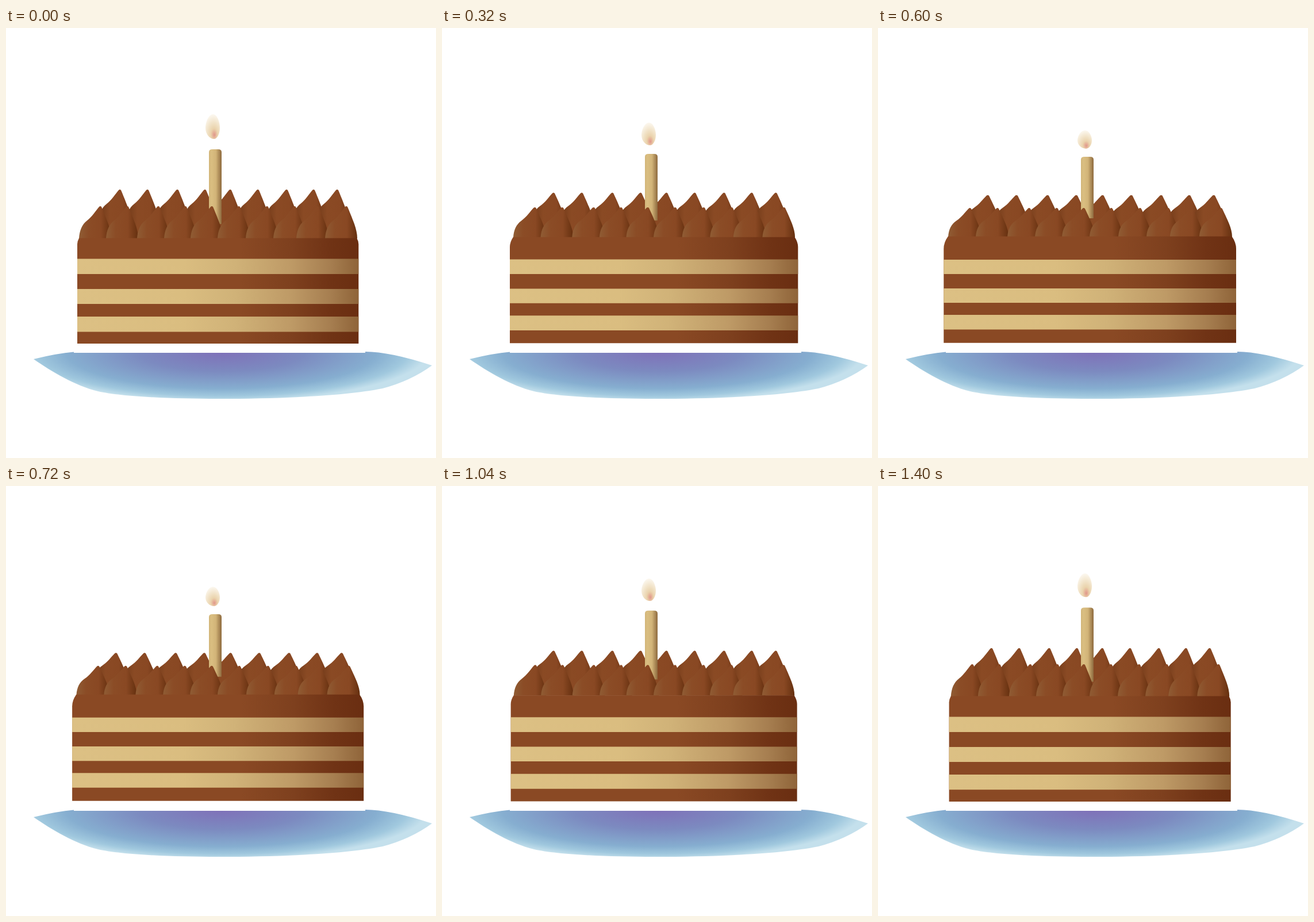
Write an HTML page that moves like this. It is 748 px wide and 748 px high and loops after 1440 ms.

```html
<!DOCTYPE html>
<html lang="en">
<head>
<meta charset="utf-8">
<title>Cake</title>
<style>
  html, body { margin: 0; width: 100%; height: 100%; overflow: hidden; background: #fff; }
  svg { display: block; width: 100vw; height: 100vh; }
</style>
</head>
<body>
<svg viewBox="0 0 748 748">
  <defs>
    <linearGradient id="choc">
      <stop offset="0" stop-color="#8a4924"/>
      <stop offset=".58" stop-color="#8a4924"/>
      <stop offset=".76" stop-color="#7e401e"/>
      <stop offset=".9" stop-color="#703315"/>
      <stop offset="1" stop-color="#6a2e11"/>
    </linearGradient>
    <linearGradient id="cream">
      <stop offset="0" stop-color="#dcc084"/>
      <stop offset=".38" stop-color="#dabd80"/>
      <stop offset=".56" stop-color="#d0b278"/>
      <stop offset=".76" stop-color="#be9a66"/>
      <stop offset=".9" stop-color="#a67e50"/>
      <stop offset="1" stop-color="#8f6439"/>
    </linearGradient>
    <linearGradient id="wax">
      <stop offset="0" stop-color="#d2b67a"/>
      <stop offset=".2" stop-color="#dabe81"/>
      <stop offset=".55" stop-color="#d2b478"/>
      <stop offset="1" stop-color="#8e6a3e"/>
    </linearGradient>
    <linearGradient id="front">
      <stop offset="0" stop-color="#8f5c34"/>
      <stop offset=".3" stop-color="#8b4c26"/>
      <stop offset=".68" stop-color="#894823"/>
      <stop offset="1" stop-color="#65300f"/>
    </linearGradient>
    <linearGradient id="back">
      <stop offset="0" stop-color="#713a19"/>
      <stop offset=".35" stop-color="#8a4a24"/>
      <stop offset=".75" stop-color="#894823"/>
      <stop offset="1" stop-color="#6f3716"/>
    </linearGradient>
    <radialGradient id="dish" gradientUnits="userSpaceOnUse" cx="0" cy="0" r="1"
        gradientTransform="translate(375 563) scale(360 86)">
      <stop offset="0" stop-color="#7f70b8"/>
      <stop offset=".4" stop-color="#7c8ac0"/>
      <stop offset=".75" stop-color="#86aed0"/>
      <stop offset=".9" stop-color="#a0c8de"/>
      <stop offset="1" stop-color="#c4e0ec"/>
    </radialGradient>
    <radialGradient id="glow" cx=".56" cy=".75" r=".78" fx=".62" fy=".84">
      <stop offset="0" stop-color="#e0968a"/>
      <stop offset=".15" stop-color="#e6b49a"/>
      <stop offset=".3" stop-color="#ead3ac"/>
      <stop offset=".6" stop-color="#f2e4ca"/>
      <stop offset="1" stop-color="#fdfaf4"/>
    </radialGradient>
  </defs>
  <path fill="url(#dish)" d="M48 576Q88 566 118 563.5V565H625V563Q668 563 741 587Q704 614 655 627
    C590 640 480 645 370 645C280 645 200 641 160 632C120 622 80 598 48 576Z"/>
  <path id="flame" fill="url(#glow)"/>
  <g id="backRow" fill="url(#back)"></g>
  <path id="candle" fill="url(#wax)"/>
  <g id="frontRow" fill="url(#front)"></g>
  <path id="body" fill="url(#choc)"/>
  <g id="stripes" fill="url(#cream)"></g>
</svg>
<script>
const LOOP = 1440, STEP = 40;
const TIMES = [0, 200, 440, 600, 840, 1040, 1400];
const SQUASH = [0, .35, .85, 1, .76, .45, .04];
const LAG = [0, .33, .8, 1, .88, .57, .1];
const FLAME_TOP = [150, 157, 172, 178, 170, 161, 152];
const FLAME_LOW = [193, 199, 208, 210, 207, 200, 193.3];

const $ = id => document.getElementById(id);
const lerp = (a, b, p) => a + (b - a) * p;

function add(parent, d, transform) {
  const el = document.createElementNS('http://www.w3.org/2000/svg', 'path');
  if (d) el.setAttribute('d', d);
  if (transform) el.setAttribute('transform', transform);
  return parent.appendChild(el);
}

// Periodic monotone cubic through the key values
function track(values, t) {
  const n = TIMES.length;
  const time = i => TIMES[(i + n) % n] + LOOP * Math.floor(i / n);
  const val = i => values[(i + n) % n];
  const slope = i => (val(i + 1) - val(i)) / (time(i + 1) - time(i));
  const tangent = i => {
    const a = slope(i - 1), b = slope(i);
    return a * b <= 0 ? 0 : 2 * a * b / (a + b);
  };
  let i = n - 1;
  while (TIMES[i] > t) i--;
  const h = time(i + 1) - time(i), u = (t - time(i)) / h, v = 1 - u;
  return val(i) * (1 + 2 * u) * v * v + h * tangent(i) * u * v * v
       + val(i + 1) * u * u * (3 - 2 * u) - h * tangent(i + 1) * u * u * v;
}

const drop = foot => `M-37 ${foot}V56C-36 42-32 32-23 25C-14 18-8 8-2 1Q0-1 2 1` +
  `C5 8 10 20 14 31C17 40 19 48 19 56V${foot}Z`;
for (const x of [198, 246, 298, 346, 390, 438, 488, 535, 576])
  add($('backRow'), drop(76), `translate(${x} 281)`);
for (const x of [164, 211, 265, 312, 358, 405, 454, 502, 542, 592])
  add($('frontRow'), drop(56), `translate(${x} 310)`);

// Top and bottom of each cream layer, relaxed and squashed
const LAYERS = [[401.5, 428, 403, 428], [454, 480, 453, 478], [502, 528.5, 499, 524.5]];
const stripes = LAYERS.map(() => add($('stripes')));

function scaleAbout(el, x, y, dy, sx, sy) {
  el.setAttribute('transform',
    `translate(${x} ${y + dy}) scale(${sx} ${sy}) translate(${-x} ${-y})`);
}

function draw(t) {
  const p = track(SQUASH, t), q = track(LAG, t);
  scaleAbout($('backRow'), 375, 363, 0, 1 + .04 * q, 1 - .118 * q);
  scaleAbout($('frontRow'), 368, 366, -3 * p, 1 + .0205 * p, 1 - .108 * p);

  const l = lerp(124, 114.3, p), r = lerp(613.3, 623, p);
  const top = lerp(365.5, 362.5, p), low = lerp(549, 547.7, p);
  const arm = lerp(376, 384, p), inset = lerp(3, 7.5, p), mid = lerp(371, 373, p);
  $('body').setAttribute('d', `M${l} ${low}V${arm}Q${l} ${mid} ${l + inset} ${top}` +
    `H${r - inset}Q${r} ${mid} ${r} ${arm}V${low}Z`);
  LAYERS.forEach(([a, b, c, d], i) => stripes[i].setAttribute('d',
    `M${l} ${lerp(a, c, p)}H${r}V${lerp(b, d, p)}H${l}Z`));

  const tip = lerp(211, 224, p), foot = lerp(341, 331, p);
  $('candle').setAttribute('d',
    `M353 ${foot}V${tip + 5}q0-5 6-5h10q6 0 6 5V${foot}Z`);

  const a = track(FLAME_TOP, t), b = track(FLAME_LOW, t), y = k => lerp(a, b, k);
  $('flame').setAttribute('d', `M360 ${a}C367 ${a} 372 ${y(.3)} 372 ${y(.55)}` +
    `C372 ${y(.8)} 367 ${b} 362 ${b}C354 ${b} 347 ${y(.8)} 347 ${y(.55)}` +
    `C347 ${y(.3)} 353 ${a} 360 ${a}Z`);
}

const start = performance.now();
function tick() {
  const t = (performance.now() - start) % LOOP;
  draw(Math.floor(t / STEP) * STEP);
  requestAnimationFrame(tick);
}
tick();
</script>
</body>
</html>
```
